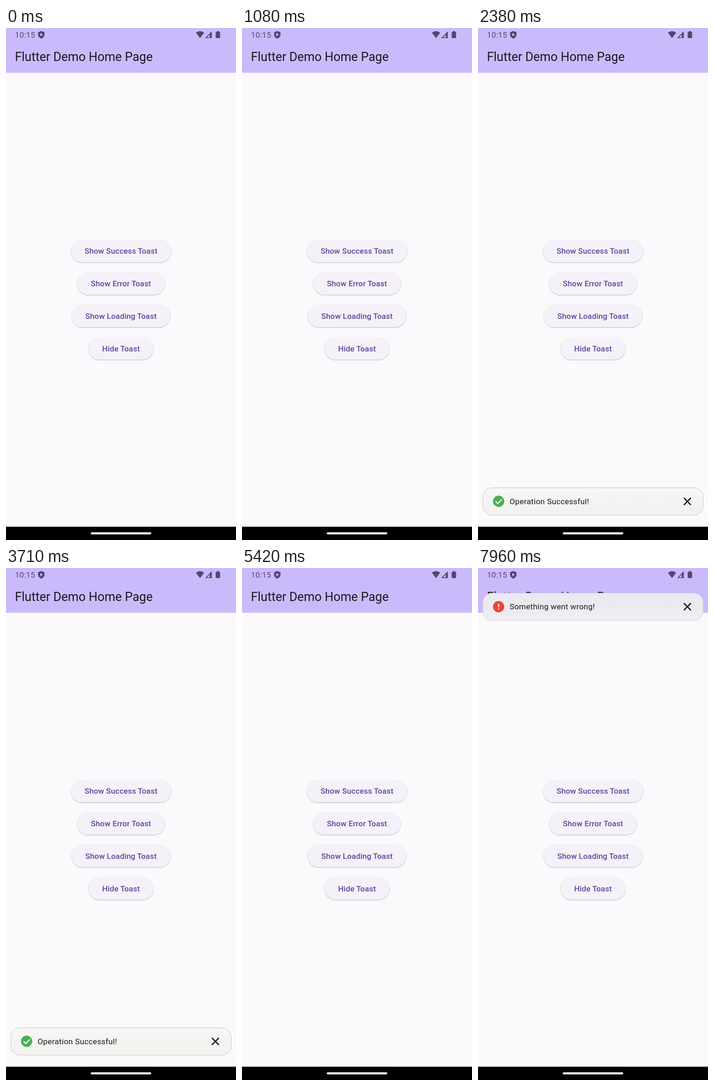
Recreate the animation shown at these times as an HTML page. Size 502x1116 px, loop 8 s.

```html
<!DOCTYPE html>
<html lang="en">
<head>
<meta charset="utf-8">
<title>Toast demo</title>
<style>
  html, body { margin: 0; width: 100%; height: 100%; overflow: hidden; background: #fcf9fc; }
  svg { display: block; width: 502px; height: 1116px; font-family: Roboto, sans-serif; }
  .button { font-size: 17.08px; font-weight: 500; letter-spacing: .12px; text-anchor: middle; fill: #5b489f; }
  .message { font-size: 17.08px; letter-spacing: .34px; fill: #19191b; }
  .pill { fill: #f5f1f8; filter: drop-shadow(0 1.2px .8px rgba(0, 0, 0, .27)); }
  .card { filter: drop-shadow(0 .6px .6px rgba(0, 0, 0, .12)); }
</style>
</head>
<body>
<svg viewBox="0 0 502 1116">
  <defs>
    <radialGradient id="ink">
      <stop offset=".35" stop-color="#6750a4" stop-opacity=".15"/>
      <stop offset="1" stop-color="#6750a4" stop-opacity="0"/>
    </radialGradient>
    <linearGradient id="greenGlass" x2="0" y2="1">
      <stop stop-color="#f8f8f6"/><stop offset=".5" stop-color="#f3f4f2"/><stop offset="1" stop-color="#f1f2ef"/>
    </linearGradient>
    <linearGradient id="redGlass" x2="0" y2="1">
      <stop stop-color="#ebe8f2"/><stop offset=".5" stop-color="#ebeaef"/><stop offset="1" stop-color="#f1eff3"/>
    </linearGradient>
  </defs>

  <rect width="502" height="1116" fill="#fcf9fc"/>
  <rect width="502" height="97.5" fill="#cbbafb"/>
  <text x="19.5" y="72.3" font-size="26.85" fill="#1b1824">Flutter Demo Home Page</text>
  <g id="buttons"></g>

  <g id="success">
    <rect class="card" x="10.5" y="1002.2" width="481" height="59.5" rx="20" fill="url(#greenGlass)" stroke="#c6cbb9"/>
    <circle cx="45" cy="1031.6" r="12.3" fill="#4caf50"/>
    <path d="M38.3 1031.8l4.7 4.8 9-9.2" fill="none" stroke="#fff" stroke-width="2.2"/>
    <text class="message" x="69" y="1038">Operation Successful!</text>
    <path d="M449.3 1024.2l15.4 15.4m0-15.4l-15.4 15.4" stroke="#080808" stroke-width="2.5"/>
  </g>

  <g id="error">
    <rect class="card" x="10.5" y="54.7" width="481" height="59.3" rx="20" fill="url(#redGlass)" stroke="#cfcad8" stroke-width=".8"/>
    <circle cx="45" cy="84.4" r="12.3" fill="#f44336"/>
    <path d="M45 78.2v7.4m0 2.4v2.5" stroke="#fff" stroke-width="2.5"/>
    <text class="message" x="69" y="90.4">Something went wrong!</text>
    <path d="M449.3 76.7l15.4 15.4m0-15.4l-15.4 15.4" stroke="#080808" stroke-width="2.5"/>
  </g>

  <g fill="#51486a">
    <text x="19.6" y="20.6" font-size="17.1" letter-spacing=".3">10:15</text>
    <path fill-rule="evenodd" d="M77 6.5l7 2.7v5.3c0 4-3 7.300-7 8.700-4-1.400-7-4.700-7-8.700V9.200zM74.800 10.800v7.400l5.800-3.700z"/>
    <path d="M414.500 10.300q9-7 18 0L423.500 22z"/>
    <path fill-rule="evenodd" d="M449.200 7v15H434.500zM447.500 11.200l-9 9.200h6.200v-6.300l2.800-2.800z"/>
    <path d="M460.300 6.800h4.400v1.700h1.300q1.300 0 1.300 1.300v10.900q0 1.300-1.300 1.300h-7q-1.300 0-1.300-1.300V9.800q0-1.300 1.300-1.300h1.300z"/>
  </g>

  <rect y="1087" width="502" height="29"/>
  <rect x="185" y="1099.2" width="132" height="4.600" rx="2.300" fill="#fff"/>
</svg>
<script>
const LOOP = 8000;
const byId = id => document.getElementById(id);
const clamp = v => Math.max(0, Math.min(1, v));
const progress = (t, start, length) => clamp((t - start) / length);
const easeOut = p => 1 - (1 - p) ** 3;

// Label, half width, and for tappable buttons the press time and point
const buttons = [
  { label: 'Show Success Toast', half: 109.4, tap: 1750, x: 286, y: 493 },
  { label: 'Show Error Toast', half: 95.6, tap: 5430, x: 286, y: 565 },
  { label: 'Show Loading Toast', half: 107.6 },
  { label: 'Hide Toast', half: 71 }
];

byId('buttons').innerHTML = buttons.map(({ label, half, tap, x, y }, i) => {
  const top = 461.8 + i * 70.75;
  const shape = `x="${251 - half}" y="${top}" width="${half * 2}" height="48.800" rx="24.400"`;
  const ink = tap ? `<clipPath id="clip${i}"><rect ${shape}/></clipPath>
    <g id="ink${i}" clip-path="url(#clip${i})"><rect ${shape} fill="#51486a" opacity=".06"/>
    <circle id="ripple${i}" cx="${x}" cy="${y}" fill="url(#ink)"/></g>` : '';
  return `<rect class="pill" ${shape}/>${ink}<text class="button" x="251" y="${top + 30.500}">${label}</text>`;
}).join('');

function press(t, { tap }, i) {
  const active = t >= tap ? 1 - progress(t, tap + 220, 300) : 0;
  byId('ink' + i).setAttribute('opacity', active * progress(t, tap, 60));
  byId('ripple' + i).setAttribute('r', 20 + 190 * progress(t, tap, 520) ** 1.700);
}

function slide(id, y) {
  byId(id).setAttribute('transform', `translate(0 ${y})`);
}

function draw(t) {
  buttons.forEach((button, i) => button.tap && press(t, button, i));
  const entered = easeOut(progress(t, 1900, 400));
  const left = progress(t, 4790, 310) ** 2;
  slide('success', 92 * (1 - entered + left));
  slide('error', -122 * (1 - easeOut(progress(t, 5560, 400))));
}

function tick() {
  draw(performance.now() % LOOP);
  requestAnimationFrame(tick);
}
tick();
</script>
</body>
</html>
```
